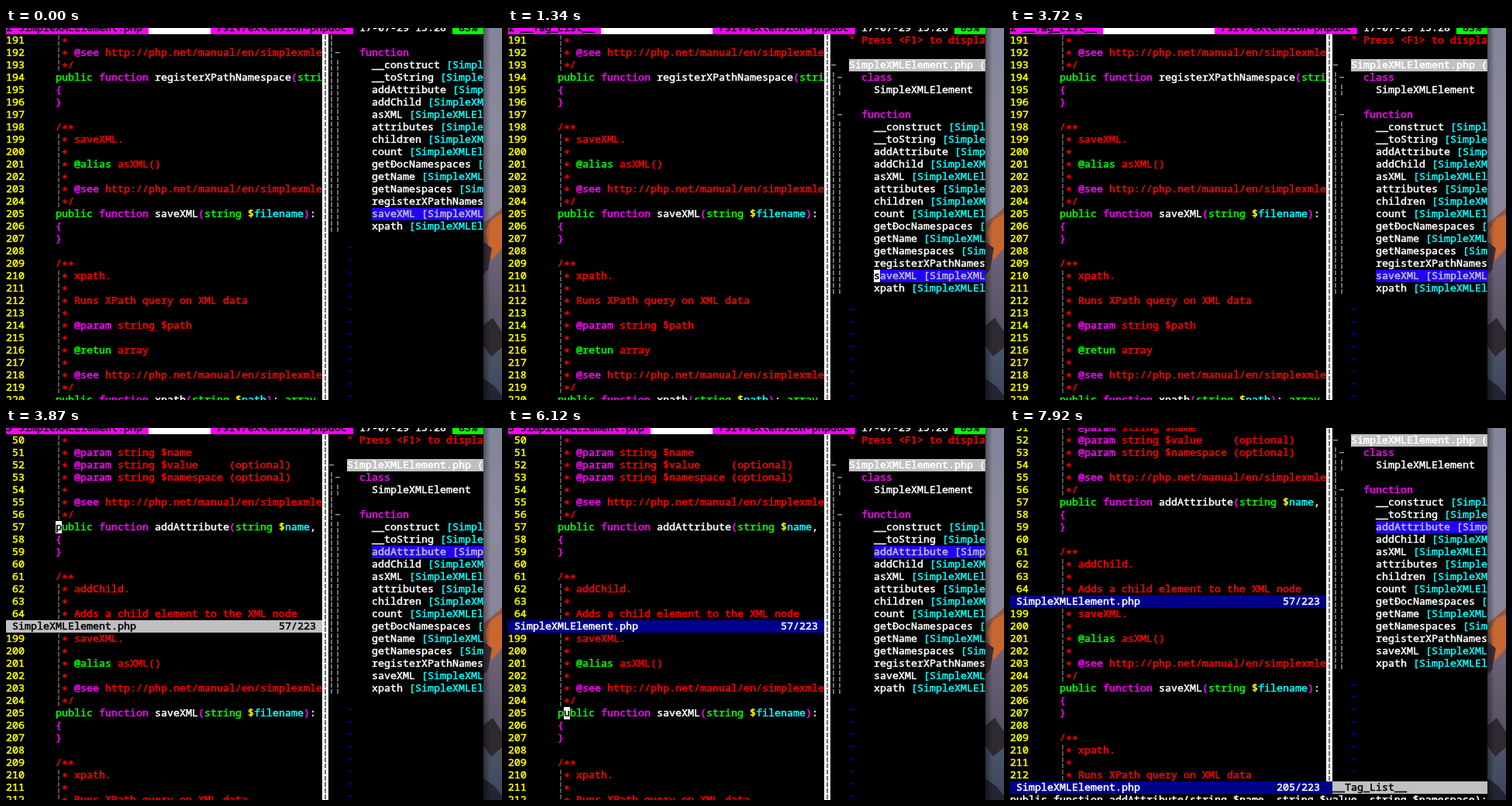
An HTML page with a canvas that plays this animation: 640x480 px, repeating every 8 s.

```html
<!DOCTYPE html>
<html lang="en">
<head>
<meta charset="utf-8">
<title>Tag list</title>
<style>
html, body { margin: 0; width: 100%; height: 100%; overflow: hidden; background: #000; }
canvas { display: block; }
</style>
</head>
<body>
<canvas id="stage" width="640" height="480"></canvas>
<script>
const ctx = document.getElementById('stage').getContext('2d');
const CW = 8, CH = 16, LOOP = 8000;
const C = {
  red: '#ff0000', green: '#00ff00', pink: '#ff00ff', cyan: '#00ffff', yellow: '#ffff00',
  white: '#ffffff', black: '#000000', grey: '#c0c0c0', navy: '#00008b', pick: '#2200ff',
  guide: '#777777', fold: '#9a9a9a', tilde: '#0000b0'
};
const SEE = ' * @see http://php.net/manual/en/simplexmlelement';
const FILE = 'SimpleXMLElement.php';

const upper = [
  ' *', ' * @param string $name', ' * @param string $value     (optional)',
  ' * @param string $namespace (optional)', ' *', SEE, ' */',
  'public function addAttribute(string $name, string $value', '{', '}', '',
  '/**', ' * addChild.', ' *', ' * Adds a child element to the XML node'
];
const lower = [
  ' *', SEE, ' */', 'public function registerXPathNamespace(string $prefix', '{', '}', '',
  '/**', ' * saveXML.', ' *', ' * @alias asXML()', ' *', SEE, ' */',
  'public function saveXML(string $filename):', '{', '}', '',
  '/**', ' * xpath.', ' *', ' * Runs XPath query on XML data', ' *',
  ' * @param string $path', ' *', ' * @retun array', ' *', SEE, ' */',
  'public function xpath(string $path): array'
];
const tags = ['__construct', '__toString', 'addAttribute', 'addChild', 'asXML', 'attributes',
  'children', 'count', 'getĐocNamespaces', 'getName', 'getNamespaces',
  'registerXPathNamespace', 'saveXML', 'xpath'];

// Each step changes only the listed fields; cursor is [x, y, letter] or null.
const steps = [
  [0, { title: '2 ' + FILE, split: false, listTop: -72, pick: 'saveXML', bar: C.grey, shift: 0, cursor: null }],
  [150, { listTop: 8, cursor: [72, 232, 'u'] }],
  [900, { cursor: null }],
  [1050, { cursor: [72, 232, 'u'] }],
  [1340, { title: '2 __Tag_List__', cursor: [472, 312, 's'] }],
  [2090, { cursor: [472, 296, 'r'] }],
  [2390, { cursor: [472, 248, 'g'] }],
  [2540, { cursor: [472, 184, 'a'] }],
  [2680, { cursor: [472, 152, 'a'] }],
  [3430, { cursor: null }],
  [3580, { cursor: [472, 152, 'a'] }],
  [3720, { cursor: null }],
  [3870, { title: '3 ' + FILE, split: true, pick: 'addAttribute', cursor: [64, 120, 'p'] }],
  [4470, { cursor: null }],
  [4770, { cursor: [64, 120, 'p'] }],
  [5520, { cursor: null }],
  [5820, { cursor: [64, 120, 'p'] }],
  [6120, { bar: C.navy, cursor: [72, 360, 'u'] }],
  [7020, { title: '3 __Tag_List__', cursor: [472, 152, 'a'] }],
  [7620, { cursor: null }],
  [7920, { shift: -32 }]
];

function box(x, y, w, h, color) {
  ctx.fillStyle = color;
  ctx.fillRect(x, y, w, h);
}

// Writes a run of cells whose top left is x, y; returns the x after it.
// The thin outline gives the strokes a medium weight.
function put(text, x, y, color) {
  ctx.fillStyle = ctx.strokeStyle = color;
  ctx.fillText(text, x, y + 12);
  ctx.strokeText(text, x, y + 12);
  return x + text.length * CW;
}

function clip(x, y, w, h, paint) {
  ctx.save();
  ctx.beginPath();
  ctx.rect(x, y, w, h);
  ctx.clip();
  paint();
  ctx.restore();
}

function dashes(x, y, color) {
  box(x + 3.3, y + 1, 1.4, 6, color);
  box(x + 3.3, y + 9, 1.4, 6, color);
}

function comment(line, x, y) {
  if (line[0] === ' ') dashes(x, y, C.guide);
  for (const part of line.split(/(@\w+|\*+)/)) {
    const star = part[0] === '*';
    let color = C.red;
    if (/^@(alias|retun)/.test(part)) color = C.green;
    else if (part[0] === '@') color = C.pink;
    x = put(part, x, star ? y + 3 : y, color);
  }
}

function code(line, x, y) {
  let last = '';
  for (const part of line.match(/\w+|./g) || []) {
    let color = C.white;
    if (/^(public|string|array)$/.test(part)) color = C.green;
    else if (/^(function|[(){}])$/.test(part)) color = C.pink;
    else if (part === '$') color = C.yellow;
    else if (last === '$') color = C.cyan;
    x = put(part, x, y, color);
    last = part;
  }
}

function source(lines, first, y) {
  lines.forEach((line, i) => {
    const top = y + i * CH;
    put(String(first + i).padStart(3), 0, top, C.yellow);
    (/^( \*|\/\*)/.test(line) ? comment : code)(line, 64, top);
  });
}

function status(y, pos, bg, width) {
  const ink = bg === C.navy ? C.white : C.black;
  box(0, y, width, CH, bg);
  put(FILE, 8, y, ink);
  put(pos, 400 - pos.length * CW, y, ink);
}

function fold(marks, y) {
  [...marks].forEach((m, i) => {
    const x = 416 + i * CW;
    if (m === '|') dashes(x, y, C.fold);
    else box(x + 1, y + 7, 6, 1.4, C.fold);
  });
}

function tagList(s) {
  let y = s.listTop;
  put('" Press <F1> to display help', 440, y, C.red);
  y += 2 * CH;
  fold('-', y);
  box(440, y, 176, CH, C.grey);
  put(FILE + ' (', 440, y, C.white);
  fold('|-', y += CH);
  put('class', 456, y, C.pink);
  fold('||', y += CH);
  put('SimpleXMLElement', 472, y, C.white);
  fold('|', y += CH);
  fold('|-', y += CH);
  put('function', 456, y, C.pink);
  for (const tag of tags) {
    fold('||', y += CH);
    const on = tag === s.pick;
    if (on) box(472, y, 144, CH, C.pick);
    const x = put(tag, 472, y, on ? C.grey : C.white);
    put(' [SimpleXMLElement]', x, y, on ? C.grey : C.cyan);
  }
  for (y += 2 * CH; y < 488; y += CH) put('~', 440, y - 4, C.tilde);
}

function titleBar(title) {
  const end = (title.length + 1) * CW;
  box(0, -8, end, CH, C.pink);
  put(title, 0, -8, C.black);
  box(end, -8, 264 - end, CH, C.white);
  box(264, -8, 184, CH, C.pink);
  put('/srv/extension-phpdoc', 272, -8, C.black);
  put('17-07-29 15:28', 456, -8, C.white);
  box(576, -8, 40, CH, C.green);
  put('83%', 584, -8, C.black);
}

function poly(color, ...pts) {
  ctx.fillStyle = color;
  ctx.beginPath();
  for (let i = 0; i < pts.length; i += 2) ctx.lineTo(pts[i], pts[i + 1]);
  ctx.fill();
}

function fade(x0, y0, x1, y1, ...colors) {
  const g = ctx.createLinearGradient(x0, y0, x1, y1);
  colors.forEach((c, i) => g.addColorStop(i / (colors.length - 1), c));
  return g;
}

function wallpaper() {
  box(616, 0, 24, 480, fade(0, 0, 0, 250, '#82849a', '#8b899c', '#8a8498'));
  poly(fade(0, 240, 0, 480, '#8d5a45', '#6b6076', '#5d5668', '#4a5268', '#3c465c'),
    616, 252, 626, 244, 640, 232, 640, 480, 616, 480);
  poly('#c8672f', 618, 262, 628, 246, 640, 240, 640, 284, 626, 300);
  poly('#3d3038', 616, 276, 627, 284, 622, 312, 616, 318);
  poly('#2f2a31', 616, 384, 628, 374, 640, 392, 640, 412, 626, 424, 616, 410);
  poly('#232630', 616, 452, 630, 462, 640, 474, 640, 480, 616, 480);
  box(616, 0, 9, 480, fade(616, 0, 625, 0, 'rgba(0,0,0,.4)', 'rgba(0,0,0,0)'));
}

function draw(s) {
  ctx.font = '500 13.3333px "Noto Sans Mono", "DejaVu Sans Mono", monospace';
  ctx.lineWidth = 0.5;
  ctx.lineJoin = 'round';
  box(0, 0, 640, 480, C.black);
  clip(0, 0, 616, 480, () => {
    ctx.translate(0, s.shift);
    clip(0, 0, 408, 520, () => {
      if (s.split) {
        source(upper, 50, 8);
        source(lower.slice(8, 22), 199, 264);
        status(248, '57/223', s.bar, 408);
      } else {
        source(lower, 191, 8);
      }
    });
    clip(416, 8, 200, 504, () => tagList(s));
    box(408, 8, 8, 480, C.white);
    for (let y = 8; y < 488; y += CH) dashes(408, y, '#333333');
    titleBar(s.title);
    if (s.cursor) {
      const [x, y, letter] = s.cursor;
      box(x, y, CW, CH, C.white);
      put(letter, x, y, C.black);
    }
    if (s.shift) {
      status(488, '205/223', C.navy, 416);
      box(416, 488, 200, CH, C.grey);
      put('__Tag_List__', 416, 488, C.black);
      box(0, 504, 616, CH, C.black);
      put('public function addAttribute(string $name, string $value, string $namespace):', 0, 504, C.white);
    }
  });
  wallpaper();
}

let state = {};
const states = steps.map(([at, change]) => [at, state = { ...state, ...change }]);
const start = performance.now();
let shown = null;

function tick() {
  const t = (performance.now() - start) % LOOP;
  const now = states.findLast(([at]) => at <= t)[1];
  if (now !== shown) draw(shown = now);
  requestAnimationFrame(tick);
}
tick();
</script>
</body>
</html>
```
